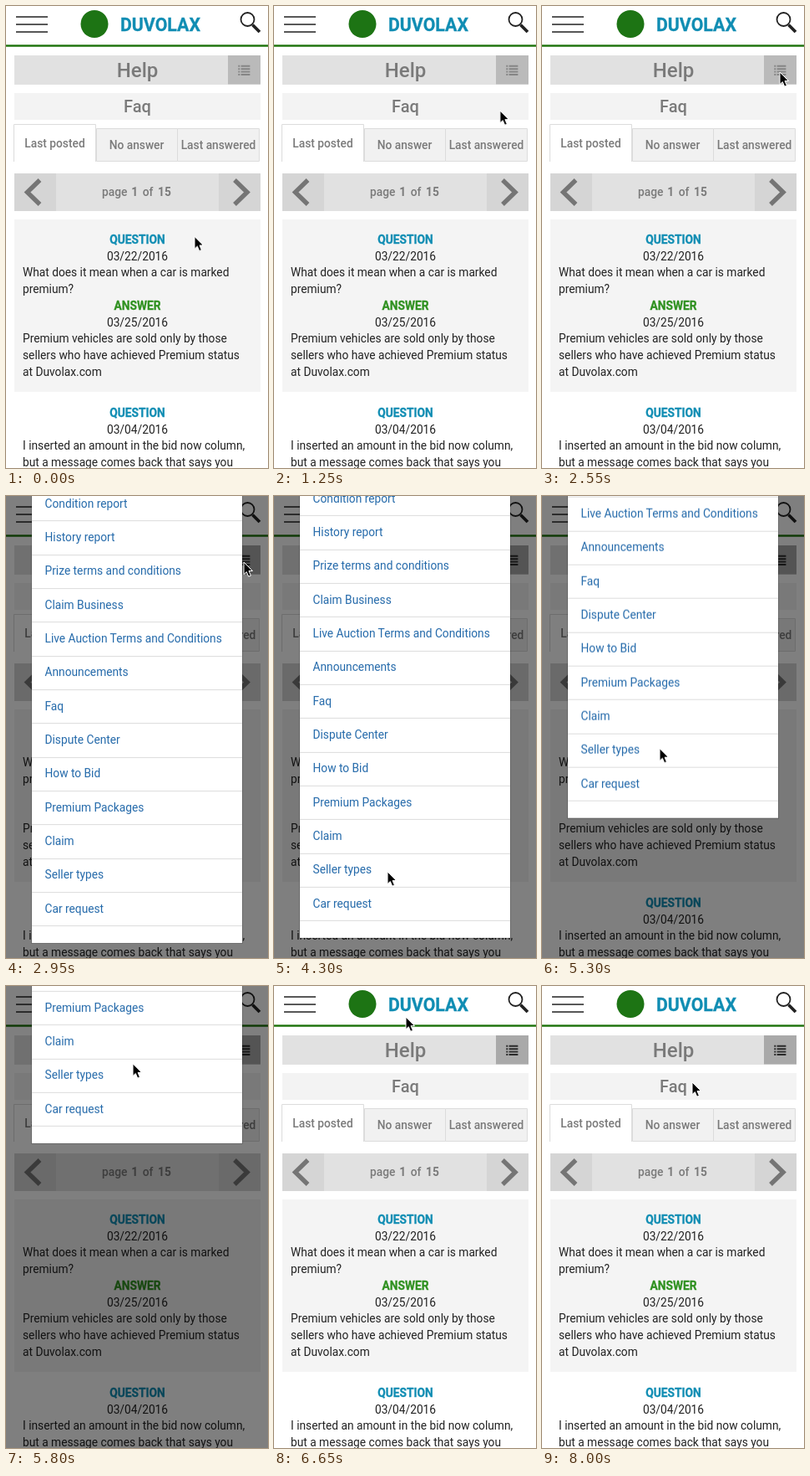
Recreate the animation shown at these times as an HTML page. Size 314 by 552 pixels, loop 8.05 s.

```html
<!DOCTYPE html>
<html lang="en">
<head>
<meta charset="utf-8">
<title>Help page</title>
<style>
html, body { margin: 0; width: 100%; height: 100%; overflow: hidden; background: #fff; }
svg { display: block; width: 314px; height: 552px; font: 13.75px Roboto, sans-serif; }
text { white-space: pre; }
.mid { text-anchor: middle; }
.grey { fill: #7a7a7a; font-weight: 500; }
.bold { font-weight: 700; }
.body { fill: #222; }
.question, .answer, .brand { font-weight: 700; stroke-width: .3; }
.question, .brand { fill: #108db3; stroke: #108db3; }
.answer { fill: #2f9120; stroke: #2f9120; }
.link { fill: #2369aa; }

#cursor, #scroll, #slide, #shade, #button, #icon {
  animation: 8050ms linear infinite;
}
#cursor { animation-name: point; }
#scroll { animation-name: scroll; }
#slide { animation-name: slide; }
#shade { animation-name: shade; }
#button { animation-name: press; }
#icon { animation-name: darken; }

@keyframes point {
  0%, .62% { transform: translate(226px, 275.5px); }
  10.56% { transform: translate(260px, 160px); }
  21.12% { transform: translate(283px, 86px); }
  31.68%, 40.99% { transform: translate(285px, 79px); animation-timing-function: ease-in-out; }
  50.31%, 51.55% { transform: translate(134px, 498px); }
  53.42% { transform: translate(136px, 449px); }
  57.14% { transform: translate(137px, 401px); }
  62.11% { transform: translate(139px, 338px); }
  65.84% { transform: translate(141px, 302px); }
  72.05% { transform: translate(152px, 93px); }
  75.16% { transform: translate(156px, 50px); }
  82.61% { transform: translate(158px, 37px); }
  94.41% { transform: translate(178px, 110px); }
  99.38%, 100% { transform: translate(180px, 115px); }
}
@keyframes scroll {
  0%, 51.55% { transform: translateY(0); }
  53.42% { transform: translateY(-49px); }
  57.14% { transform: translateY(-96px); }
  62.11% { transform: translateY(-157px); }
  65.84% { transform: translateY(-192px); }
  72.05% { transform: translateY(-389px); }
  75.16%, 100% { transform: translateY(-432px); }
}
@keyframes slide {
  0%, 34.78% { transform: translateY(-138px); opacity: 0; animation-timing-function: ease-out; }
  36.65% { opacity: 1; }
  38.51%, 76.4% { transform: none; opacity: 1; animation-timing-function: ease-out; }
  78.26% { opacity: 0; }
  80.12%, 100% { transform: translateY(-138px); opacity: 0; }
}
@keyframes shade {
  0%, 33.54% { opacity: 0; }
  35.4%, 77.64% { opacity: .5; }
  79.5%, 100% { opacity: 0; }
}
@keyframes press {
  0%, 32.9% { fill: #bababa; }
  32.91%, 100% { fill: #a9a9a9; }
}
@keyframes darken {
  0%, 32.9% { stroke: #858585; }
  32.91%, 100% { stroke: #2a2a2a; }
}
</style>
</head>
<body>
<svg viewBox="0 0 314 552">
  <rect width="314" height="552" fill="#fff"/>

  <!-- header -->
  <path d="M12 13H50M12 22H50M12 31H50" stroke="#222" stroke-width="1.6"/>
  <circle cx="106" cy="21.5" r="16.5" fill="#1d7414"/>
  <text x="137" y="30" class="brand" font-size="21.3">DUVOLAX</text>
  <g fill="none" stroke="#222">
    <circle cx="289.5" cy="16" r="8" stroke-width="1.8"/>
    <path d="M295.5 22.5L304 31" stroke-width="3.8"/>
  </g>
  <rect y="46.3" width="314" height="2.4" fill="#1c7209"/>

  <!-- title bars -->
  <rect x="10" y="59" width="295" height="35" fill="#e1e1e1"/>
  <rect id="button" x="266" y="59" width="39" height="34.5"/>
  <g id="icon" stroke-width="1.9">
    <path d="M278.3 71.8H280.3M278.3 75.2H280.3M278.3 78.6H280.3M278.3 82H280.3"/>
    <path d="M281.6 71.8H292.4M281.6 75.2H292.4M281.6 78.6H292.4M281.6 82H292.4"/>
  </g>
  <text x="157.5" y="85" class="mid grey" font-size="24">Help</text>
  <rect x="10" y="104" width="295" height="32" fill="#f3f3f3"/>
  <text x="157.5" y="127" class="mid grey" font-size="20">Faq</text>

  <!-- tabs -->
  <g stroke="#dcdcdc">
    <path d="M108.5 146.5H205.5V185.5H108.5ZM205.5 146.5H303.5V185.5H205.5Z" fill="#f1f1f1"/>
    <path d="M9.5 186V141.5H107.5V186" fill="#fff"/>
  </g>
  <text x="58.5" y="169" class="mid grey">Last posted</text>
  <text x="156.5" y="171" class="mid grey">No answer</text>
  <text x="254.5" y="171" class="mid grey">Last answered</text>

  <!-- pager -->
  <rect x="10" y="200" width="295" height="45" fill="#e1e1e1"/>
  <path d="M10 200H60V245H10ZM255 200H305V245H255Z" fill="#d5d5d5"/>
  <path d="M40.5 208L25.5 222.5L40.5 237M274 208L289 222.5L274 237" fill="none" stroke="#757575" stroke-width="5.4"/>
  <text x="115" y="227" class="grey">page</text>
  <text x="154.3" y="227" class="mid grey bold">1</text>
  <text x="170" y="227" class="mid grey">of</text>
  <text x="190" y="227" class="mid grey bold">15</text>

  <rect x="10" y="255" width="295" height="206" fill="#f4f4f4"/>
  <g id="posts"></g>

  <rect id="shade" width="314" height="552"/>
  <g id="slide"><g id="scroll">
    <g id="menu" transform="translate(31 11)">
      <rect x="-1" width="254" height="567" fill="#000" opacity=".15"/>
      <rect width="252" height="566" fill="#fff"/>
    </g>
  </g></g>

  <path id="cursor" d="M0 0V14.6L3.3 11.6L5.7 17.2L8.4 16.1L6 10.5H10.5Z" fill="#000" stroke="#fff" stroke-width="1" stroke-linejoin="round"/>
</svg>
<script>
const make = (parent, tag, attrs, text = "") => {
  const el = document.createElementNS("http://www.w3.org/2000/svg", tag);
  for (const key in attrs) el.setAttribute(key, attrs[key]);
  el.textContent = text;
  parent.append(el);
};
const byId = id => document.getElementById(id);

const addPost = (top, lines) => lines.forEach((line, i) => {
  const heading = { QUESTION: "question", ANSWER: "answer" }[line];
  const centred = heading || /^\d/.test(line);
  make(byId("posts"), "text", {
    x: centred ? 157.5 : 20,
    y: Math.round(top + i * 19.75),
    class: (heading || "body") + (centred ? " mid" : "")
  }, line);
});

addPost(283.9, [
  "QUESTION", "03/22/2016",
  "What does it mean when a car is marked", "premium?",
  "ANSWER", "03/25/2016",
  "Premium vehicles are sold only by those",
  "sellers who have achieved Premium status",
  "at Duvolax.com"
]);
addPost(490.8, [
  "QUESTION", "03/04/2016",
  "I inserted an amount in the bid now column,",
  "but a message comes back that says you"
]);

const links = [
  "Condition report", "History report", "Prize terms and conditions",
  "Claim Business", "Live Auction Terms and Conditions", "Announcements",
  "Faq", "Dispute Center", "How to Bid", "Premium Packages", "Claim",
  "Seller types", "Car request"
];
const rowHeight = 40.33;
links.forEach((label, i) => {
  const y = 21 + i * rowHeight;
  make(byId("menu"), "text", { x: 15.5, y: y + 24.7, class: "link" }, label);
  make(byId("menu"), "rect", { y: Math.round(y + rowHeight), width: 252, height: 1, fill: "#ddd" });
});
</script>
</body>
</html>
```
